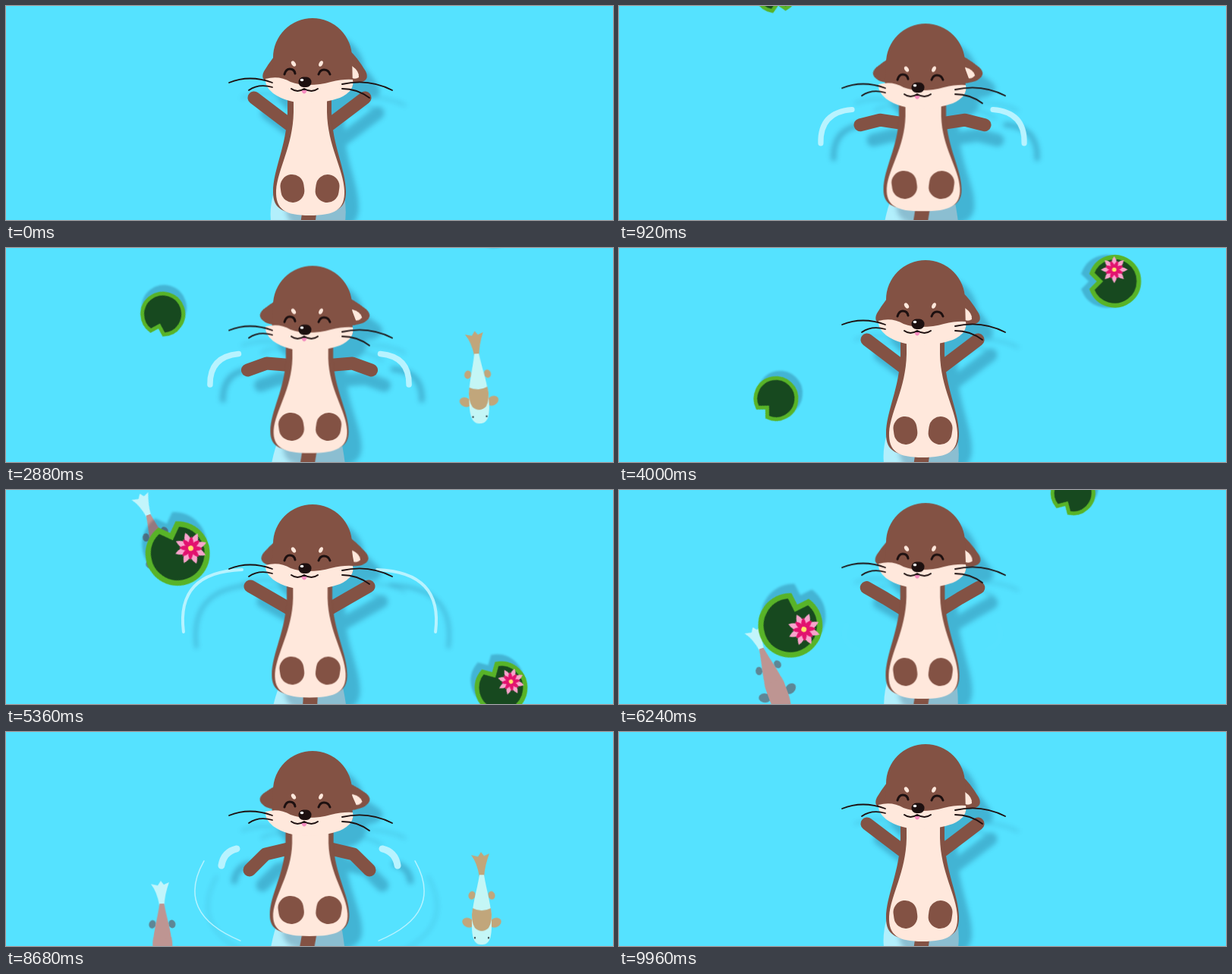
Animation of 800x282 px, one loop 10000 ms. Source, as an HTML page without scripts:

```html
<!DOCTYPE html>
<html lang="en">
<head>
<meta charset="utf-8">
<title>Swimming otter</title>
<style>
  html, body { margin: 0; width: 100%; height: 100%; overflow: hidden; background: #55e2ff; }
  svg { display: block; width: 100vw; height: 100vh; }

  .fur { fill: #835244; }
  .cream { fill: #ffe8dc; }
  .line { fill: none; stroke: #1d1010; stroke-linecap: round; }

  /* Floating leaves drift down while turning */
  .leaf { fill: #17491f; stroke: #58b328; stroke-width: 5; }
  .plain { filter: drop-shadow(-9px 1px 1px rgb(0 20 60 / .22)); }
  .bloom { filter: drop-shadow(9px 0 1px rgb(0 20 60 / .22)); }
  .pad { animation: 10s linear infinite; }
  .pad-a { animation-name: pad-a; }
  .pad-b { animation-name: pad-b; }
  .pad-c { animation-name: pad-c; }
  .pad-d { animation-name: pad-d; }
  @keyframes pad-a {
    0% { transform: translate(206.5px, -32px) rotate(77deg); animation-timing-function: cubic-bezier(.33, 0, .67, .33); }
    50%, 100% { transform: translate(206.5px, 330px) rotate(167deg); }
  }
  @keyframes pad-b {
    0%, 40% { transform: translate(226px, -56px) rotate(-164deg); }
    53.6% { transform: translate(226px, 83px) rotate(-110deg); }
    70.8% { transform: translate(226px, 268px) rotate(-35deg); }
    76.6%, 100% { transform: translate(226px, 332px) rotate(-9deg); }
  }
  @keyframes pad-c {
    0%, 23.6% { transform: translate(653px, -48px) rotate(154deg); animation-timing-function: cubic-bezier(.33, 0, .67, .33); }
    56.8%, 100% { transform: translate(652px, 330px) rotate(260deg); }
  }
  @keyframes pad-d {
    0%, 52.5% { transform: translate(598px, -42px) rotate(109deg); animation-timing-function: cubic-bezier(.33, 0, .67, .33); }
    80.2%, 100% { transform: translate(598px, 320px) rotate(199deg); }
  }

  /* Fish enter from the top, --at is the entry time */
  .fish { animation: swim 10s linear calc(var(--at) - 10s) infinite; }
  .fin { fill: var(--fin); }
  .skin { fill: var(--skin); }
  .patch { fill: var(--patch); }
  .tail-fin { fill: var(--tail); }
  .tan { --skin: #c4f6f6; --patch: #c1a67b; --fin: #c1a67b; --tail: #c1a67b; }
  .rose { --skin: #be9592; --patch: #be9592; --fin: #5d8796; --tail: #c2f5fb; }
  @keyframes swim {
    from { transform: translateY(0); }
    27%, to { transform: translateY(540px); }
  }

  /* Otter stroke, one cycle in two seconds */
  .otter { filter: drop-shadow(17px 20px 3px rgb(0 20 60 / .22)); }
  .head, .body, .feet, .ear, .arm, .tail, .wake, .ring, .wave { animation: 2s linear infinite; }
  .head { animation-name: head; }
  .body { animation-name: body; transform-origin: 400px 206px; }
  .feet { animation-name: feet; transform-origin: 400px 241px; }
  .ear { animation-name: ear; transform-origin: 450px 92px; }
  .arm { animation-name: arm; fill: none; stroke: #835244; stroke-width: 17; stroke-linecap: round; stroke-linejoin: round; }
  .tail { animation-name: tail; transform-origin: 402px 255px; }
  .wake { animation-name: wake; fill: #b2effc; }
  .ring, .wave { fill: none; stroke: #b8f3ff; stroke-linecap: round; }
  .ring { animation-name: ring; }
  .wave { animation-name: wave; }

  @keyframes head {
    0% { transform: none; animation-timing-function: cubic-bezier(.33, 0, .67, .33); }
    34% { transform: translateY(9px); }
    54% { transform: translateY(6px); }
    68% { transform: translateY(3px); animation-timing-function: ease-out; }
    88%, 100% { transform: none; }
  }
  @keyframes body {
    0% { transform: scale(1); animation-timing-function: cubic-bezier(.33, 0, .67, .33); }
    34% { transform: scale(1.09, .9); }
    54% { transform: scale(1.06, .935); }
    68% { transform: scale(1.035, .965); animation-timing-function: ease-out; }
    88%, 100% { transform: scale(1); }
  }
  @keyframes feet {
    0% { transform: none; animation-timing-function: cubic-bezier(.33, 0, .67, .33); }
    34% { transform: translateY(-6px) scaleX(1.08); }
    54% { transform: translateY(-4px) scaleX(1.05); }
    68% { transform: translateY(-2.5px) scaleX(1.03); animation-timing-function: ease-out; }
    88%, 100% { transform: none; }
  }
  @keyframes ear {
    0% { transform: translate(0, 0) rotate(0deg); animation-timing-function: cubic-bezier(.33, 0, .67, .33); }
    34% { transform: translate(5px, -5px) rotate(-24deg); }
    54% { transform: translate(4px, -4px) rotate(-18deg); }
    68% { transform: translate(2px, -2px) rotate(-11deg); animation-timing-function: ease-out; }
    88%, 100% { transform: translate(0, 0) rotate(0deg); }
  }
  @keyframes arm {
    0% { d: path("M327 121L352 140L385 165"); animation-timing-function: cubic-bezier(.33, 0, .67, .33); }
    34% { d: path("M321 182L342 161L380 152"); }
    54% { d: path("M316 140L345 143L380 158"); }
    68% { d: path("M322 127L350 143L385 163"); animation-timing-function: ease-out; }
    88%, 100% { d: path("M327 121L352 140L385 165"); }
  }
  @keyframes tail {
    0%, 88%, 100% { transform: none; }
    34% { transform: rotate(3deg); }
    54% { transform: rotate(0deg); }
    68% { transform: rotate(-5deg); }
  }
  @keyframes wake {
    0%, 88%, 100% { d: path("M353 245Q346 270 350 290H446Q450 270 445 245Z"); }
    34% { d: path("M360 245Q352 265 348 290H447Q444 265 440 245Z"); }
    68% { d: path("M366 245Q355 268 351 290H449Q446 265 440 245Z"); }
  }
  @keyframes ring {
    0%, 30% { d: path("M292 176Q293 168 301 164"); stroke-width: 10px; opacity: 0; }
    34% { d: path("M284 176Q287 158 304 154"); stroke-width: 9px; opacity: 1; }
    54% { d: path("M254 184Q250 128 309 125"); stroke-width: 6px; opacity: 1; }
    68% { d: path("M234 187Q224 108 311 105"); stroke-width: 4px; opacity: 1; }
    86%, 100% { d: path("M219 190Q210 90 312 88"); stroke-width: 1px; opacity: 0; }
  }
  @keyframes wave {
    0%, 12% { d: path("M300 178Q290 200 314 210"); stroke-width: 7px; opacity: 0; }
    18% { d: path("M288 176Q272 212 312 230"); stroke-width: 5px; opacity: 1; }
    34% { d: path("M261 170Q222 239 309 275"); stroke-width: 1.5px; opacity: 1; }
    42%, 100% { d: path("M254 168Q212 248 308 286"); stroke-width: .5px; opacity: 0; }
  }
</style>
</head>
<body>
<svg viewBox="0 0 800 282" preserveAspectRatio="none">
  <defs>
    <path id="leaf" class="leaf" d="M25 9A27 27 0 1 1 25 -9L16 0Z"/>
    <path id="petal" d="M0 0Q-6 -7 0 -15Q6 -7 0 0Z"/>
    <g id="four">
      <use href="#petal"/>
      <use href="#petal" transform="rotate(90)"/>
      <use href="#petal" transform="rotate(180)"/>
      <use href="#petal" transform="rotate(270)"/>
    </g>
    <g id="eight">
      <use href="#four"/>
      <use href="#four" transform="rotate(45)"/>
    </g>
    <g id="flower">
      <use href="#eight" fill="#f9a3cc"/>
      <use href="#eight" fill="#e2126f" transform="rotate(22.5) scale(.72)"/>
      <circle r="2.4" fill="#ffe36b"/>
    </g>
    <g id="flower-leaf">
      <use href="#leaf" class="bloom"/>
      <use href="#flower" y="13"/>
    </g>

    <g id="koi">
      <path class="tail-fin" d="M-3 -89Q-6 -108 -14 -118L-5 -116L-1 -122L3 -117L10 -120Q4 -104 3 -89Z"/>
      <g class="fin">
        <ellipse cx="-13" cy="-65" rx="4.5" ry="5.5" transform="rotate(15 -13 -65)"/>
        <ellipse cx="13" cy="-65" rx="4.5" ry="5.5" transform="rotate(-15 13 -65)"/>
        <ellipse cx="-18" cy="-29" rx="8" ry="6" transform="rotate(25 -18 -29)"/>
        <ellipse cx="18" cy="-29" rx="8" ry="6" transform="rotate(-25 18 -29)"/>
      </g>
      <path class="skin" d="M-3 -92C-6 -72 -14 -50 -13 -25C-13 -5 -8 0 0 0C8 0 13 -5 13 -25C14 -50 6 -72 3 -92Z"/>
      <path class="patch" d="M-12 -48Q0 -42 12 -48Q15 -32 9 -22Q0 -14 -9 -22Q-15 -32 -12 -48Z"/>
      <g fill="#33484c"><circle cx="-9" cy="-9" r="1.2"/><circle cx="9" cy="-9" r="1.2"/></g>
    </g>

    <path id="ear" class="fur" d="M452 58Q462 66 474 86Q480 98 466 101Q456 102 445 98Z"/>
  </defs>

  <g class="fish tan" style="--at:1.725s"><use href="#koi" transform="translate(625) rotate(-3)"/></g>
  <g class="fish rose" style="--at:4.765s"><use href="#koi" transform="translate(219) rotate(-20)"/></g>
  <g class="fish rose" style="--at:7.09s"><use href="#koi" transform="translate(207) rotate(-1)"/></g>
  <g class="fish tan" style="--at:7.28s"><use href="#koi" transform="translate(627)"/></g>

  <g class="pad pad-a"><use href="#leaf" class="plain"/></g>
  <g class="pad pad-b"><use href="#flower-leaf" transform="scale(1.44)"/></g>
  <g class="pad pad-c"><use href="#flower-leaf" transform="scale(1.18)"/></g>
  <g class="pad pad-d"><use href="#leaf" class="plain"/></g>

  <path class="wake" d="M353 245Q346 270 350 290H446Q450 270 445 245Z"/>

  <g class="otter">
    <!-- Each side is written out: animations inside use copies run on their own clock -->
    <g>
      <path class="wave" d="M300 178Q290 200 314 210"/>
      <path class="ring" d="M292 176Q293 168 301 164"/>
      <path class="arm" d="M327 121L352 140L385 165"/>
    </g>
    <g transform="matrix(-1 0 0 1 800 0)">
      <path class="wave" d="M300 178Q290 200 314 210"/>
      <path class="ring" d="M292 176Q293 168 301 164"/>
      <path class="arm" d="M327 121L352 140L385 165"/>
    </g>
    <path class="tail" d="M402 255L396 300" fill="none" stroke="#835244" stroke-width="19"/>

    <g class="body">
      <path class="fur" d="M371 115V140C370 185 352 215 352 245C352 268 365 274 400 274C435 274 448 268 448 245C448 215 430 185 429 140V115Z"/>
      <path class="cream" d="M379 115V140C378 185 358 215 356 243C355 268 368 276 400 276C434 276 447 268 446 243C445 215 424 185 423 140V115Z"/>
    </g>
    <g class="feet fur">
      <rect x="362" y="222" width="31" height="37" rx="15.5" transform="rotate(-8 377 241)"/>
      <rect x="408" y="222" width="31" height="37" rx="15.5" transform="rotate(8 423 241)"/>
    </g>

    <g class="head">
      <g transform="matrix(-1 0 0 1 814 0)"><use href="#ear" class="ear"/></g>
      <g class="ear">
        <use href="#ear"/>
        <path class="cream" d="M456 79Q466 86 465 94Q461 97 456 95Z"/>
      </g>
      <path class="fur" d="M352 68A52 52 0 0 1 456 68L457 106H350Z"/>
      <path class="cream" d="M342 96Q360 91 375 100Q386 104 398 104Q415 104 428 100Q445 96 457 97Q460 112 440 121Q420 128 399 128Q370 128 352 115Q341 106 342 96Z"/>
      <ellipse class="cream" cx="379" cy="76" rx="2.5" ry="4" transform="rotate(-35 379 76)"/>
      <ellipse class="cream" cx="415" cy="76" rx="2.5" ry="4" transform="rotate(25 415 76)"/>
      <path d="M389 111Q393 120 397 111Z" fill="#f58bc0"/>
      <g class="line" stroke-width="2">
        <path d="M367 90Q369 83 374 83Q380 83 381 89M412 90Q414 84 419 84Q425 84 427 90" stroke-width="3"/>
        <path d="M376 109Q384 115 393 109Q403 115 411 109"/>
      </g>
      <rect x="385.5" y="93.5" width="17" height="13.5" rx="6.5" fill="#1d1010"/>
      <ellipse cx="390" cy="97.5" rx="2.3" ry="1.8" fill="#fff"/>
      <path class="line" stroke-width="1.8" d="M351 101Q321 90 294 101M351 107Q333 102 320 111M443 103Q478 95 509 111M443 109Q463 109 479 121"/>
    </g>
  </g>
</svg>
</body>
</html>
```
